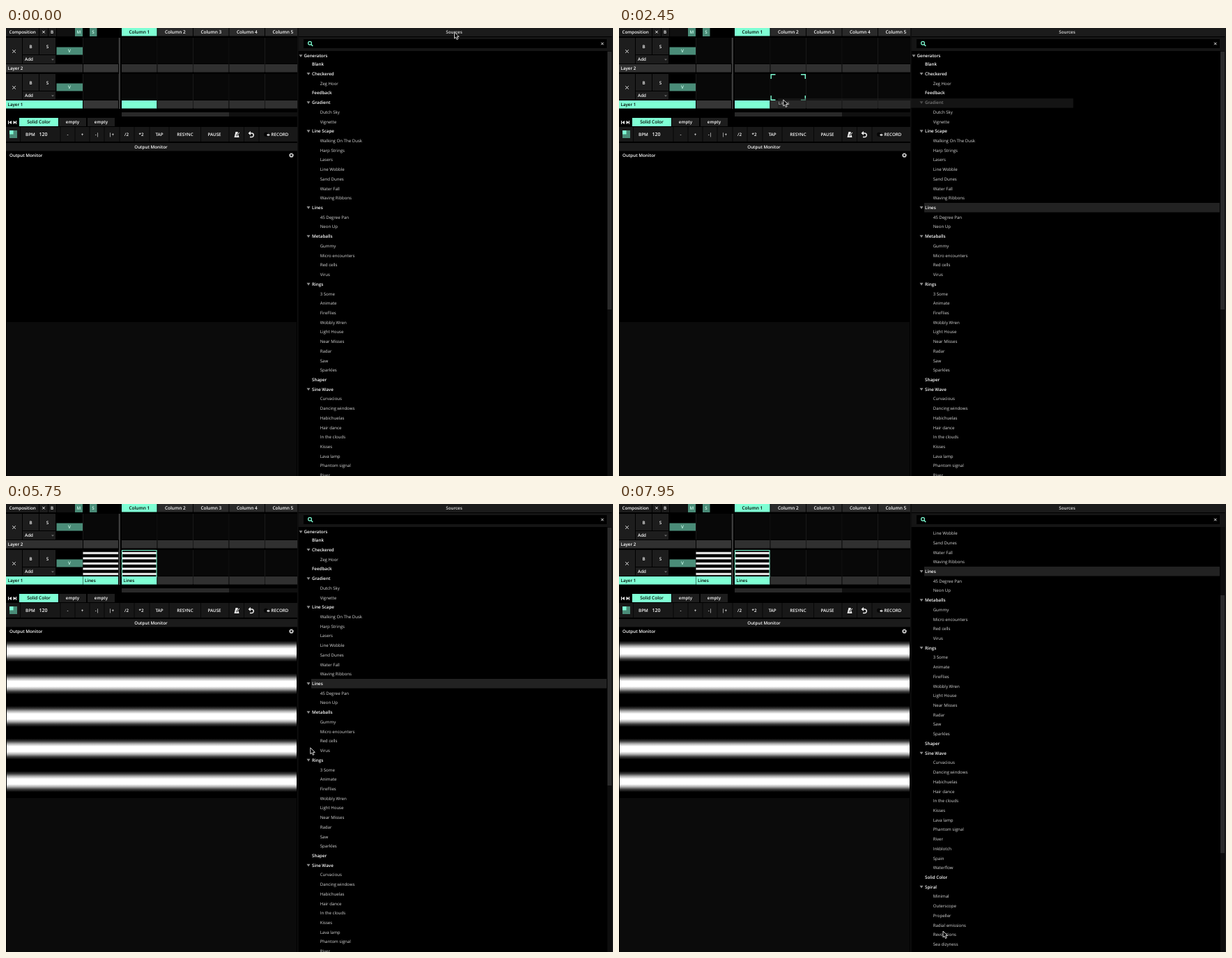
Write an HTML page that moves like this. It is 871 px wide and 643 px high and loops after 8000 ms.

```html
<!DOCTYPE html>
<html lang="en">
<head>
<meta charset="utf-8">
<title>Drag a generator into a clip slot</title>
<style>
html, body { margin: 0; height: 100%; overflow: hidden; background: #000; }
svg { display: block; width: 871px; height: 643px; }
text { font: 600 6.25px "Open Sans", "Noto Sans", sans-serif; text-rendering: geometricPrecision; white-space: pre; }
.child { font-weight: 500; font-size: 6.1px; }
</style>
</head>
<body>
<svg id="stage" viewBox="0 0 871 643" xmlns="http://www.w3.org/2000/svg"></svg>
<script>
const MINT = '#7fffd4', TEAL = '#4a8c78', PANEL = '#1b1b1b', BUTTON = '#1d1d1d', CELL = '#080808', LABEL = '#303030';
const LOOP = 8000, ROW = 13.72, FIRST_ROW = 52, LINES_Y = FIRST_ROW + 15 * ROW;

// Markup helpers; text is placed by its vertical centre.
const rect = (x, y, w, h, fill, extra = '') =>
  `<rect x="${x}" y="${y}" width="${w}" height="${h}" fill="${fill}" ${extra}/>`;
const text = (s, x, y, fill = '#fff', anchor = 'start', extra = '') =>
  `<text x="${x}" y="${y + 2.25}" fill="${fill}" text-anchor="${anchor}" ${extra}>${s}</text>`;
const mid = (s, x, y, fill, extra) => text(s, x, y, fill, 'middle', extra);
const path = (d, fill, extra = '') => `<path d="${d}" fill="${fill}" ${extra}/>`;
const line = (d, stroke, width = 1, extra = '') =>
  path(d, 'none', `stroke="${stroke}" stroke-width="${width}" ${extra}`);
const cross = (x, y, r) => line(`M${x - r} ${y - r}l${2 * r} ${2 * r}m0 ${-2 * r}l${-2 * r} ${2 * r}`, '#eee');
const group = (id, body, extra = '') => `<g id="${id}" ${extra}>${body}</g>`;

const columnX = i => 166 + 51.5 * i;

// A repeating soft white stripe.
const stripes = (id, top, period) => `<linearGradient id="${id}" gradientUnits="userSpaceOnUse"
  x1="0" x2="0" y1="${top}" y2="${top + period}" spreadMethod="repeat">` +
  [[.18, '#000'], [.26, '#3c3c3c'], [.34, '#b0b0b0'], [.42, '#fff'], [.58, '#fff'], [.66, '#b0b0b0'], [.74, '#3c3c3c'], [.82, '#000']]
    .map(([o, c]) => `<stop offset="${o}" stop-color="${c}"/>`).join('') + '</linearGradient>';

function layer(name, y, active) {
  let s = rect(0, y, 23, 37, BUTTON) + cross(11.5, y + 19.5, 2.2) +
    rect(24, y, 23, 24, BUTTON) + mid('B', 35.5, y + 12.5) +
    rect(48, y, 23, 24, BUTTON) + mid('S', 59.5, y + 12.5) +
    rect(24, y + 25, 47, 12, BUTTON) + text('Add', 27, y + 31) +
    path(`M65 ${y + 30.5}h4l-2 2z`, '#777') +
    rect(72.5, y + 13.5, 37.5, 11, TEAL) + mid('V', 91, y + 19, '#cfe') +
    rect(0, y + 38, 110, 11.5, active ? MINT : LABEL) +
    text(name, 2.5, y + 44, active ? '#000' : '#fff') +
    rect(111, y, 50, 37, CELL) + rect(111, y + 38, 50, 11.5, '#363636') +
    line(`M110.5 ${y}v37M161.5 ${y}v37`, '#191919');
  for (let i = 0; i < 5; i++)
    s += rect(columnX(i), y, 50.5, 37, CELL) +
      rect(columnX(i), y + 38, 50.5, 11.5, active && !i ? MINT : LABEL) +
      line(`M${columnX(i) + 51} ${y}v49`, '#191919');
  return s;
}

function mixer() {
  let s = rect(0, 0, 47, 12, PANEL) + text('Composition', 4.5, 5.7) +
    rect(48, 0, 12, 12, PANEL) + cross(54, 5.7, 1.8) +
    rect(61, 0, 11, 12, PANEL) + mid('B', 66, 5.7) +
    rect(73, 0, 26, 12, '#101010') +
    rect(99, 0, 11, 12, TEAL) + mid('M', 104.5, 5.7, '#cfe') +
    rect(120, 0, 10.5, 12, TEAL) + mid('S', 125, 5.7, '#cfe');
  for (let i = 0; i < 5; i++)
    s += rect(columnX(i), 0, 50.5, 11.5, i ? '#2a2a2a' : MINT) +
      mid('Column ' + (i + 1), columnX(i) + 25.3, 5.7, i ? '#fff' : '#000', 'style="font-size:6.5px"');
  s += layer('Layer 2', 14, false) + layer('Layer 1', 66, true) +
    rect(162, 14, 2, 102, '#3c3c3c') +
    rect(166, 121, 252, 6, '#101010') + rect(166, 121, 154, 6, '#292929');
  // Deck tabs
  s += path('M3 133v5h1v-5zM8 133v5l-4-2.5zM10.500 133v5l4-2.500zM14 133v5h1v-5z', '#eee') +
    rect(19, 129, 56, 12, MINT) + mid('Solid Color', 47, 135, '#000', 'style="font-size:6.5px"') +
    rect(76, 129, 39, 12, BUTTON) + mid('empty', 95.5, 135) +
    rect(117, 129, 39, 12, BUTTON) + mid('empty', 136.5, 135);
  return s;
}

function toolbar() {
  let s = rect(0, 142, 418, 21, '#181818') +
    [20.5, 78, 99, 120, 141, 163, 184, 206, 234, 279.5, 320, 341.5, 363]
      .map(x => line(`M${x} 142v21`, '#070707')).join('') +
    rect(5, 147, 11, 11, TEAL) + `<rect id="beat" width="5.5" height="5.5" fill="${MINT}"/>` +
    text('BPM', 28, 152.7) + text('120', 47.5, 152.7, '#fff', 'start', 'style="font-size:7px"');
  for (const [label, x] of [['-', 88.5], ['+', 109.5], ['-|', 130.5], ['|+', 151.5], ['/2', 173], ['*2', 194],
    ['TAP', 220], ['RESYNC', 257], ['PAUSE', 299], ['RECORD', 393]])
    s += mid(label, x, 152.7);
  return s +
    path('M329.500 149h3l2 8h-7z', '#eee') + line('M330.500 155l4.500-5', '#181818', 2) + line('M330.500 155l4.500-5', '#eee') +
    line('M350 156.500h2.500a2.800 2.800 0 0 0 0-5.600h-3', '#eee', 1.5) + path('M347.500 151l3.500-3v6z', '#eee') +
    '<circle cx="373" cy="152.700" r="3" fill="#050505"/>' + path('M374 153.500l2.500-2v1.300h2v1.500h-2v1z', '#eee');
}

function monitor() {
  return rect(0, 165, 418, 11.5, PANEL) + mid('Output Monitor', 208, 170.7) +
    text('Output Monitor', 5, 182.7) +
    '<circle cx="409.500" cy="182.700" r="2" fill="none" stroke="#ddd" stroke-width="1.300"/>' +
    '<circle cx="409.500" cy="182.700" r="3" fill="none" stroke="#ddd" stroke-width="1" stroke-dasharray="1.200 1.156"/>' +
    rect(1, 422, 416, 221, '#0b0b0b');
}

// "+" opens a branch, "=" is a plain heading, the rest are its children.
const TREE = `=Blank|+Checkered|Zeg Hoor|=Feedback|+Gradient|Dutch Sky|Vignette|+Line Scape|Walking On The Dusk|
Harp Strings|Lasers|Line Wobble|Sand Dunes|Water Fall|Waving Ribbons|+Lines|45 Degree Pan|Neon Up|+Metaballs|Gummy|
Micro encounters|Red cells|Virus|+Rings|3 Some|Animate|FireFlies|Wobbly Wren|Light House|Near Misses|Radar|Saw|
Sparkles|=Shaper|+Sine Wave|Curvacious|Dancing windows|Habichuelas|Hair dance|In the clouds|Kisses|Lava lamp|
Phantom signal|River|Inkblotch|Spain|Waterflow|=Solid Color|+Spiral|Minimal|Outerscope|Propeller|Radial emissions|
Revolutions|Sea dizyness`.split('|').map(s => s.trim());

const arrow = (x, y) => path(`M${x - 2.5} ${y - 1.7}h5l-2.500 3.800z`, '#8a8a8a');

function sources() {
  let rows = rect(438, LINES_Y - 6.8, 424, 13.5, '#222', 'id="selected"') +
    arrow(423, 40) + text('Generators', 427.5, 39.7);
  TREE.forEach((name, i) => {
    const y = FIRST_ROW + i * ROW;
    if (name[0] === '+') rows += arrow(434, y);
    rows += /^[+=]/.test(name) ? text(name.slice(1), 439, y)
      : text(name, 450.7, y, '#d8d8d8', 'start', 'class="child"');
  });
  return rect(418, 0, 1.5, 643, '#101010') + rect(419.5, 0, 451.5, 12, PANEL) + mid('Sources', 643, 5.7, '#ddd') +
    rect(419.5, 13, 450, 20, '#151515') + rect(427, 16, 435, 13, '#000') +
    `<circle cx="436" cy="21.800" r="2.400" fill="none" stroke="${MINT}" stroke-width="1.200"/>` +
    line('M437.800 23.600l2.400 2.400', MINT, 1.4) + cross(855.700, 22.500, 1.7) +
    `<g clip-path="url(#listClip)">${group('list', rows)}</g>` +
    rect(863, 33, 6, 610, '#0d0d0d') + rect(863, 34, 6, 370, '#2a2a2a', 'id="thumb"') +
    rect(869.5, 12, 1.5, 631, '#1d1d1d');
}

const clip = group('clip', rect(166.5, 66.5, 49.5, 37.5, 'url(#small)') + text('Lines', 168.5, 110, '#000'));
const live = group('live',
  rect(1, 188, 416, 233.7, 'url(#big)') +
  rect(110.5, 66.5, 50.5, 37.5, 'url(#small)') +
  rect(110.5, 104, 50.5, 11.5, MINT) + text('Lines', 113, 110, '#000') +
  rect(166.5, 66.5, 49.5, 38, 'none', `stroke="${MINT}"`));
const brackets = group('brackets',
  line('M.7 7V.7H7M43.500 .7h6.300V7M49.800 31v6.300h-6.300M7 37.300H.7V31', MINT, 1.4));
const ghost = group('ghost',
  rect(-8, -1.8, 424, 13.5, '#222') + text('Lines', -7, 5), 'opacity=".6"');
const cursor = group('cursor',
  path('M0 0v9l2-1.800 1.500 3.300 1.700-.8-1.500-3.100h2.800z', '#000', 'stroke="#eee" stroke-width=".9"'));

const stage = document.getElementById('stage');
stage.innerHTML = `<defs>${stripes('big', 188, 46.75)}${stripes('small', 66.7, 7.5)}
  <clipPath id="listClip"><rect x="419" y="33" width="444" height="610"/></clipPath>
  <clipPath id="leftClip"><rect width="418" height="643"/></clipPath></defs>` +
  `<g clip-path="url(#leftClip)">${mixer()}${rect(columnX(1), 104, 50.5, 11.5, '#484848', 'id="hover"')}` +
  toolbar() + monitor() + clip + live + brackets + '</g>' + sources() + ghost + cursor;

// Keys are [time, ...values].
const CURSOR = [[50, 643.5, 6], [450, 570, 62], [850, 482, 147], [1200, 456, 220], [1650, 446, 255], [1800, 446, 253],
  [2050, 385, 205], [2450, 236, 103], [2600, 211, 95], [3000, 190, 87], [4500, 190, 87], [4800, 262, 128],
  [5300, 415, 322], [5900, 444, 359], [6600, 444, 359], [6850, 443, 358], [7400, 443, 358], [7700, 456, 530], [7950, 465, 613]];
const SCROLL = [[5950, 0], [6100, 32], [6200, 35], [6250, 37.2], [6350, 37.2], [6550, 52], [6650, 52],
  [6850, 91.4], [7050, 108], [7200, 108], [7450, 148], [7700, 161.1]];

function at(keys, t) {
  const i = keys.findIndex(k => k[0] > t);
  if (i < 0) return keys[keys.length - 1].slice(1);
  if (i === 0) return keys[0].slice(1);
  const a = keys[i - 1], b = keys[i], f = (t - a[0]) / (b[0] - a[0]);
  return a.slice(1).map((v, j) => v + (b[j + 1] - v) * f);
}

const el = id => document.getElementById(id);
const move = (id, x, y) => el(id).setAttribute('transform', `translate(${x} ${y})`);
const show = (id, on) => el(id).setAttribute('visibility', on ? 'visible' : 'hidden');

function draw(t) {
  const [x, y] = at(CURSOR, t), [scroll] = at(SCROLL, t);
  const dragging = t >= 1800 && t < 3250;
  const column = Math.floor((x - columnX(0)) / 51.5);
  const slotY = y > 66 && y < 116 ? 66 : 14;

  move('cursor', x, y);
  move('ghost', x, y);
  move('brackets', columnX(column), slotY);
  move('list', 0, -scroll);
  move('thumb', 0, scroll * .602);
  const beat = t % 2000 >= 750 && t % 2000 < 1750 ? 5.5 : 0;
  move('beat', 5 + beat, 147 + beat);

  show('ghost', dragging);
  show('brackets', dragging && x < 418 && y < 116);
  show('selected', t >= 1750);
  show('clip', t >= 3250);
  show('live', t >= 3950);
  show('hover', t >= 4650 && t < 4900);
}

const start = performance.now();
function tick() {
  draw((performance.now() - start) % LOOP);
  requestAnimationFrame(tick);
}
tick();
</script>
</body>
</html>
```
